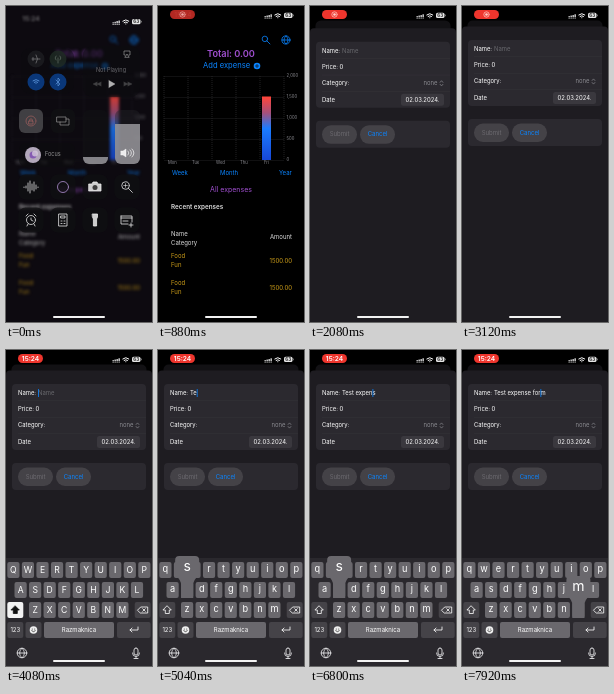
Animation of 146x316 px, one loop 8000 ms. Source, as an HTML page with a canvas:

```html
<!DOCTYPE html>
<html lang="en">
<head>
<meta charset="utf-8">
<title>Expense form</title>
<style>
html, body { margin: 0; width: 100%; height: 100%; overflow: hidden; background: #000; }
canvas { display: block; width: 100vw; height: 100vh; }
</style>
</head>
<body>
<canvas id="stage"></canvas>
<script>
const W = 146, H = 316, LOOP = 8000;
const canvas = document.getElementById('stage'), c = canvas.getContext('2d');
const BLUE = '#0a84ff', GOLD = '#c99a18', PURPLE = '#a04fd0', GREY = '#8a8a90';
let unit = 1;

const clamp = v => Math.max(0, Math.min(1, v));
const span = (t, a, b) => clamp((t - a) / (b - a));
const easeOut = p => 1 - (1 - p) ** 3;
const spring = (s, w) => s <= 0 ? 0 : 1 - (1 + w * s) * Math.exp(-w * s);

function text(s, x, y, size, color = '#fff', align = 'left', weight = 400) {
  c.font = `${weight} ${size}px Inter, Roboto, sans-serif`;
  c.textAlign = align;
  c.textBaseline = 'middle';
  c.fillStyle = color;
  c.fillText(s, x, y);
}
function box(x, y, w, h, r, color) {
  c.beginPath();
  c.roundRect(x, y, w, h, r);
  c.fillStyle = color;
  c.fill();
}
function disc(x, y, r, color) {
  c.beginPath();
  c.arc(x, y, r, 0, 7);
  c.fillStyle = color;
  c.fill();
}
// Icon paths are centred on the origin
function icon(d, x, y, color = '#fff', width = .8, filled = false, scale = 1) {
  c.save();
  c.translate(x, y);
  c.scale(scale, scale);
  c.lineCap = c.lineJoin = 'round';
  c.strokeStyle = c.fillStyle = color;
  c.lineWidth = width / scale;
  const path = new Path2D(d);
  if (filled) c.fill(path);
  c.stroke(path);
  c.restore();
}
function blur(px) {
  c.filter = px > .02 ? `blur(${px * unit}px)` : 'none';
}
const ring = r => `M${r} 0A${r} ${r} 0 1 1 ${-r} 0A${r} ${r} 0 1 1 ${r} 0`;
const ICON = {
  search: 'M1.5-1A2.5 2.5 0 1 1-3.5-1A2.5 2.5 0 1 1 1.5-1M.8.8L3.6 3.6',
  globe: ring(3.7) + 'M-3.7 0H3.7M0-3.7C-2.4-1.5-2.4 1.5 0 3.7C2.4 1.5 2.4-1.5 0-3.7',
  wifi: 'M-3-1.2Q0-3.8 3-1.2M-1.7.3Q0-1.1 1.7.3M0 1.6V1.7',
  plane: 'M-4 0H4M0-4L1.5 0L0 4M-3-1.5V1.5',
  bluetooth: 'M-2-2L2 2L0 4V-4L2-2L-2 2',
  cell: 'M0-1V4M-2-3Q-4-1-2 1M2-3Q4-1 2 1',
  airplay: 'M-2 1H-3V-3H3V1H2M-2 3L0 0L2 3Z',
  play: 'M-2-3.5L4 0L-2 3.5Z',
  skip: 'M-4-2L0 0L-4 2ZM0-2L4 0L0 2Z',
  back: 'M4-2L0 0L4 2ZM0-2L-4 0L0 2Z',
  lock: ring(5) + 'M-2 0H2V3H-2ZM-1.3 0V-1.5Q0-3 1.3-1.5V0',
  mirror: 'M-6-4H3V1H-6ZM-3 1V4H6V-2H3',
  speaker: 'M-6-2H-4L-1-4V4L-4 2H-6Z',
  waves: 'M1-2Q3 0 1 2M3-3Q6 0 3 3M5-4Q9 0 5 4',
  voice: 'M-7 0V.5M-5-1V1M-3-4V4M-1-6V6M1-3V3M3-5V4M5-2V2M7 0V.5',
  circle: ring(5.5),
  camera: 'M-6-3H-3L-2-5H2L3-3H6V4H-6Z',
  plus: 'M-1-2.2V.2M-2.2-1H.2',
  alarm: ring(4.5) + 'M0-2V0L2 1M-5-4L-3-6M5-4L3-6M-3 4L-4 6M3 4L4 6',
  calc: 'M-4-6H4V6H-4ZM-2-4H2V-2H-2ZM-2 1H-1M1 1H2M-2 3.5H-1M1 3.5H2',
  torch: 'M-2.5-6H2.5V-3L1.6-1V6H-1.6V-1L-2.5-3Z',
  note: 'M-6-4H5V2M-6-4V4H1M-6-2H5M-4 1H1M4 3V7M2 5H6',
  shift: 'M0-4L4 0H2V3.5H-2V0H-4Z',
  erase: 'M-5 0L-2-3H5V3H-2ZM0-1.3L2.6 1.3M2.6-1.3L0 1.3',
  enter: 'M4-3V0H-4M-2-2L-4 0L-2 2',
  mic: 'M0-5Q2-5 2-3V0Q2 2 0 2Q-2 2-2 0V-3Q-2-5 0-5M-3.5 0Q-3.5 3.5 0 3.5Q3.5 3.5 3.5 0M0 3.5V5.5M-2 5.5H2'
};

function expenses(dim) {
  const tint = dim > .2 ? '#68686c' : BLUE;
  icon(ICON.search, 108, 34, tint, .8, false, 1.1);
  icon(ICON.globe, 128, 34, tint, .8, false, 1.1);
  text('Total: 0.00', 73, 48, 9.2, PURPLE, 'center', 600);
  text('Add expense', 45, 60, 7.6, tint);
  disc(99, 60, 3.3, tint);
  icon('M-1.6 0H1.6M0-1.6V1.6', 99, 60, '#101012', .7);

  c.lineWidth = .4;
  c.strokeStyle = '#55555a';
  c.beginPath();
  for (let i = 0; i < 6; i++) {
    c.moveTo(6 + i * 24, 70);
    c.lineTo(6 + i * 24, 154);
  }
  c.setLineDash([1, 1]);
  c.stroke();
  c.setLineDash([]);
  ['2,000', '1,500', '1,000', '500', '0'].forEach((label, i) => {
    const y = 70 + i * 21;
    c.fillStyle = '#2a2a2d';
    c.fillRect(6, y, 120, .4);
    text(label, 128.5, y, 4.2, GREY);
  });
  const g = c.createLinearGradient(0, 91, 0, 154);
  g.addColorStop(0, '#ff453a');
  g.addColorStop(.25, '#a6507a');
  g.addColorStop(.5, '#1b7cff');
  g.addColorStop(1, '#1747d8');
  c.fillStyle = g;
  c.fillRect(104, 90.5, 9, 63.5);

  ['Mon', 'Tue', 'Wed', 'Thu', 'Fri'].forEach((day, i) => text(day, 10 + i * 24, 157, 4.2, GREY));
  text('Week', 14, 167, 6, BLUE);
  text('Month', 62, 167, 6, BLUE);
  text('Year', 121, 167, 6, BLUE);
  text('All expenses', 73, 184, 7, PURPLE, 'center');
  text('Recent expenses', 13, 201, 6.3, '#ddd', 'left', 600);
  text('Name', 13, 228, 6, '#ddd');
  text('Category', 13, 237, 6, '#ddd');
  text('Amount', 134, 231, 6, '#ddd', 'right');
  for (const y of [250, 277]) {
    text('Food', 13, y, 6, GOLD);
    text('Fun', 13, y + 9, 6, GOLD);
    text('1500.00', 134, y + 5, 6, GOLD, 'right');
  }
}

function controlCenter() {
  box(15, 42, 53, 46, 9, '#0c0c0f90');
  disc(30, 53, 8.5, '#1c1c20');
  disc(52, 53, 8.5, '#1f2a23');
  disc(30, 76, 8.5, '#0a3f8c');
  disc(52, 76, 8.5, '#0a3f8c');
  icon(ICON.plane, 30, 53, '#77777a', .9);
  icon(ICON.cell, 52, 53, '#66736a');
  icon(ICON.wifi, 30, 76, '#5f98dd', 1);
  icon(ICON.bluetooth, 52, 76, '#5f98dd');
  box(77, 40, 57, 51, 9, '#0c0c0fa0');
  icon(ICON.airplay, 121, 48, '#999');
  text('Not Playing', 105, 64, 5.6, '#77777b', 'center');
  icon(ICON.skip, 122, 78, '#4a4a4c', .4, true);
  icon(ICON.back, 91, 78, '#4a4a4c', .4, true);
  icon(ICON.play, 105, 78, '#ccc', .4, true);

  box(13, 103, 24, 24, 6, '#4a494c');
  icon(ICON.lock, 25, 115, '#a3615f');
  box(45, 103, 24, 24, 6, '#101013');
  icon(ICON.mirror, 57, 115, '#999');
  box(13, 137, 56, 24, 7, '#0c0c0fb0');
  disc(27, 149, 8, '#d0c3d8');
  disc(27, 149, 3.5, '#7d4eb0');
  disc(29, 147.5, 3, '#d0c3d8');
  text('Focus', 39, 148, 5.5, '#aaa');

  for (const [x, level] of [[77, 151], [109, 118]]) {
    c.save();
    c.beginPath();
    c.roundRect(x, 104, 25, 54, 6);
    c.clip();
    c.fillStyle = x > 100 ? '#25252880' : '#101013d0';
    c.fillRect(x, 104, 25, 54);
    c.fillStyle = '#98979c';
    c.fillRect(x, level, 25, 50);
    c.restore();
  }
  icon(ICON.speaker, 121, 147, '#fff', .5, true);
  icon(ICON.waves, 121, 147, '#fff');

  const tiles = ['voice', 'circle', 'camera', 'search', 'alarm', 'calc', 'torch', 'note'];
  tiles.forEach((name, i) => {
    const x = 25 + i % 4 * 32, y = i < 4 ? 181 : 214;
    const filled = name === 'camera' || name === 'torch';
    const scale = name === 'search' ? 1.5 : 1;
    box(x - 12.5, y - 12.5, 25, 25, 7, '#0f0f12e8');
    icon(ICON[name], x, y, name === 'circle' ? '#b996dc' : '#eee', .9, filled, scale);
    if (name === 'camera') disc(x, y + .5, 2.5, '#222');
    if (name === 'search') icon(ICON.plus, x, y, '#eee', .7, false, scale);
  });
}

function statusBar(t, closing) {
  const y = 9.3 + 6.2 * (1 - closing);
  const pill = span(t, 640, 960);
  c.globalAlpha = (1 - pill) * (.5 + .5 * closing);
  blur(1.3 * (1 - closing));
  text('15:24', 25, y - 2 * (1 - closing), 6.6, '#ccc', 'center', 600);
  blur(0);
  c.globalAlpha = pill;
  box(12, 4, 25, 9, 4.5, '#ee352d');
  if (t < 3500) {
    icon(ring(2.7), 24.5, 8.5, '#ffd0cc', .7);
    disc(24.5, 8.5, 1.3, '#ffd0cc');
  } else text('15:24', 24.5, 8.8, 6.6, '#fff', 'center', 600);
  c.globalAlpha = 1;
  for (let i = 0; i < 4; i++) {
    box(106.5 + i * 2, y + .8 - i * .6, 1.3, 1 + i * .6, .3, '#eee');
    box(106.5 + i * 2, y + 2.3, 1.3, .9, .3, '#eee');
  }
  icon(ICON.wifi, 119.8, y + .8, '#fff', 1);
  box(126, y - 2.6, 8.5, 5.4, 1.6, '#e6e6e6');
  box(135, y - .8, .7, 1.8, .3, '#999');
  text('63', 130.2, y + .2, 4.5, '#222', 'center', 700);
}

// [character, press time]
const strokes = [
  ['T', 4560], ['e', 4800], ['s', 4990], ['t', 5230], [' ', 5420], ['e', 5640],
  ['x', 5960], ['p', 6360], ['e', 6500], ['n', 6610], ['s', 6730], ['e', 6930],
  [' ', 7330], ['f', 7450], ['o', 7570], ['r', 7710], ['m', 7840]
];
const typed = t => strokes.filter(s => t >= s[1] + 60).map(s => s[0]).join('');

function sheet(t, top) {
  c.save();
  c.translate(0, top);
  box(0, 0, W, H, [4, 4, 0, 0], '#1e1c21');
  box(6, 13.5, 134, 66, 4, '#2b292f');
  box(6, 92.5, 134, 27, 4, '#2b292f');
  for (const y of [30, 46.5, 63]) {
    c.fillStyle = '#37353b';
    c.fillRect(12, y, 128, .4);
  }
  text('Name:', 12, 22.5, 5.9);
  text('Price: 0', 12, 38.5, 5.9);
  text('Category:', 12, 55, 5.9);
  text('Date', 12, 71.5, 5.9);
  const value = typed(t);
  text(value || 'Name', 32, 22.5, 5.9, value ? '#fff' : '#68686d');
  if (t > 3800 && (t > 4560 || t % 1000 < 600)) {
    c.fillStyle = BLUE;
    c.fillRect(32 + c.measureText(typed(t - 70)).width, 18.5, .8, 8);
  }
  text('none', 127.5, 55, 5.9, GREY, 'right');
  icon('M-1.4-1L0-2.6L1.4-1M-1.4 1L0 2.6L1.4 1', 131.5, 55, GREY, .7);
  box(91, 65.5, 43, 12, 2.5, '#3a383e');
  text('02.03.2024.', 112.5, 71.7, 5.9, '#fff', 'center');
  box(12, 97, 35, 18.5, 9, '#444247');
  box(50, 97, 35, 18.5, 9, '#444247');
  text('Submit', 29.5, 106.3, 6, '#6c6a70', 'center');
  text('Cancel', 67.5, 106.3, 6, BLUE, 'center');
  c.restore();
}

const rows = ['qwertyuiop', 'asdfghjkl', 'zxcvbnm'];
const STEP = 14.55, KEY = '#6a686d', DARK = '#454348';
const keyPlace = ch => {
  const r = rows.findIndex(row => row.includes(ch));
  return [[7.4, 14.6, 29.1][r] + rows[r].indexOf(ch) * STEP, 220 + r * 20];
};

function keyboard(t, drop) {
  c.save();
  c.translate(0, drop);
  c.fillStyle = '#2a282d';
  c.fillRect(0, 208, W, H - 208);
  const upper = t < 4720;
  const letter = ch => upper ? ch.toUpperCase() : ch;
  const active = strokes.find(s => t >= s[1] && t < s[1] + 130);
  for (const ch of rows.join('')) {
    const [x, y] = keyPlace(ch);
    box(x - 6.1, y - 8, 12.2, 16, 2, KEY);
    text(letter(ch), x, y - (upper ? 0 : .6), upper ? 8.6 : 9.2, '#fff', 'center');
  }
  box(1.3, 252, 16, 16, 2, upper ? '#f2f2f2' : DARK);
  icon(ICON.shift, 9.3, 260, upper ? '#111' : '#fff', .8, upper);
  box(128.7, 252, 16, 16, 2, DARK);
  icon(ICON.erase, 136.7, 260);
  box(1.3, 272, 16, 16, 2, DARK);
  text('123', 9.3, 280.2, 6, '#fff', 'center');
  box(19.5, 272, 16, 16, 2, DARK);
  disc(27.5, 280, 3.8, '#eee');
  icon('M-1.2-1V-.8M1.2-1V-.8M-1.8.8Q0 2.8 1.8.8', 27.5, 280, '#333', .8);
  box(38, 272, 70, 16, 2, active && active[0] === ' ' ? DARK : KEY);
  text('Razmaknica', 73, 280, 6, '#fff', 'center');
  box(111, 272, 33.7, 16, 2, DARK);
  icon(ICON.enter, 128, 280);
  icon(ICON.globe, 16, 303, '#e4e4e6', .9, false, 1.3);
  icon(ICON.mic, 130, 303, '#e4e4e6', .9);

  if (active && active[0] !== ' ') {
    const [x, y] = keyPlace(active[0].toLowerCase());
    const left = Math.max(1, Math.min(W - 25, x - 12));
    box(left, y - 34, 24, 22, 4, KEY);
    c.beginPath();
    c.moveTo(left + 1, y - 14);
    c.quadraticCurveTo(x - 6.1, y - 10, x - 6.1, y - 5);
    c.lineTo(x - 6.1, y + 8);
    c.lineTo(x + 6.1, y + 8);
    c.lineTo(x + 6.1, y - 5);
    c.quadraticCurveTo(x + 6.1, y - 10, left + 23, y - 14);
    c.fill();
    text(active[0], left + 12, y - 23.5, 14, '#fff', 'center');
  }
  c.restore();
}

function draw(t) {
  c.setTransform(canvas.width / W, 0, 0, canvas.height / H, 0, 0);
  c.globalAlpha = 1;
  c.fillStyle = '#000';
  c.fillRect(0, 0, W, H);
  const closing = easeOut(span(t, 40, 760));
  const present = spring((t - 1510) / 1000, 12.6);

  if (closing < 1) {
    c.globalAlpha = 1 - closing;
    c.fillStyle = '#0d0a10';
    c.fillRect(0, 0, W, H);
  }
  if (present < .998) {
    c.save();
    const s = 1 - .075 * present;
    c.translate(73 * (1 - s), 14.5 * present);
    c.scale(s, s);
    c.globalAlpha = 1;
    if (present) box(0, 0, W, H, 6, '#121114');
    blur(1.4 * (1 - closing));
    c.globalAlpha = .8 + .2 * closing - .3 * present;
    expenses(present);
    c.restore();
  } else box(5.5, 14.5, 135, 20, 5, '#121114');

  if (closing < 1) {
    c.globalAlpha = .85 * (1 - closing);
    controlCenter();
  }
  c.globalAlpha = 1;
  if (present) sheet(t, 20.5 + (H - 20.5) * (1 - present));
  if (t > 3800) keyboard(t, 108 * (1 - easeOut(span(t, 3800, 4060))));
  statusBar(t, closing);
  box(47, 310, 52, 1.9, 1, '#f2f2f2');
}

function resize() {
  const dpr = devicePixelRatio || 1;
  canvas.width = Math.round(innerWidth * dpr);
  canvas.height = Math.round(innerHeight * dpr);
  unit = canvas.width / W;
}
addEventListener('resize', resize);
resize();
const start = performance.now();
function frame() {
  draw((performance.now() - start) % LOOP);
  requestAnimationFrame(frame);
}
frame();
</script>
</body>
</html>
```
